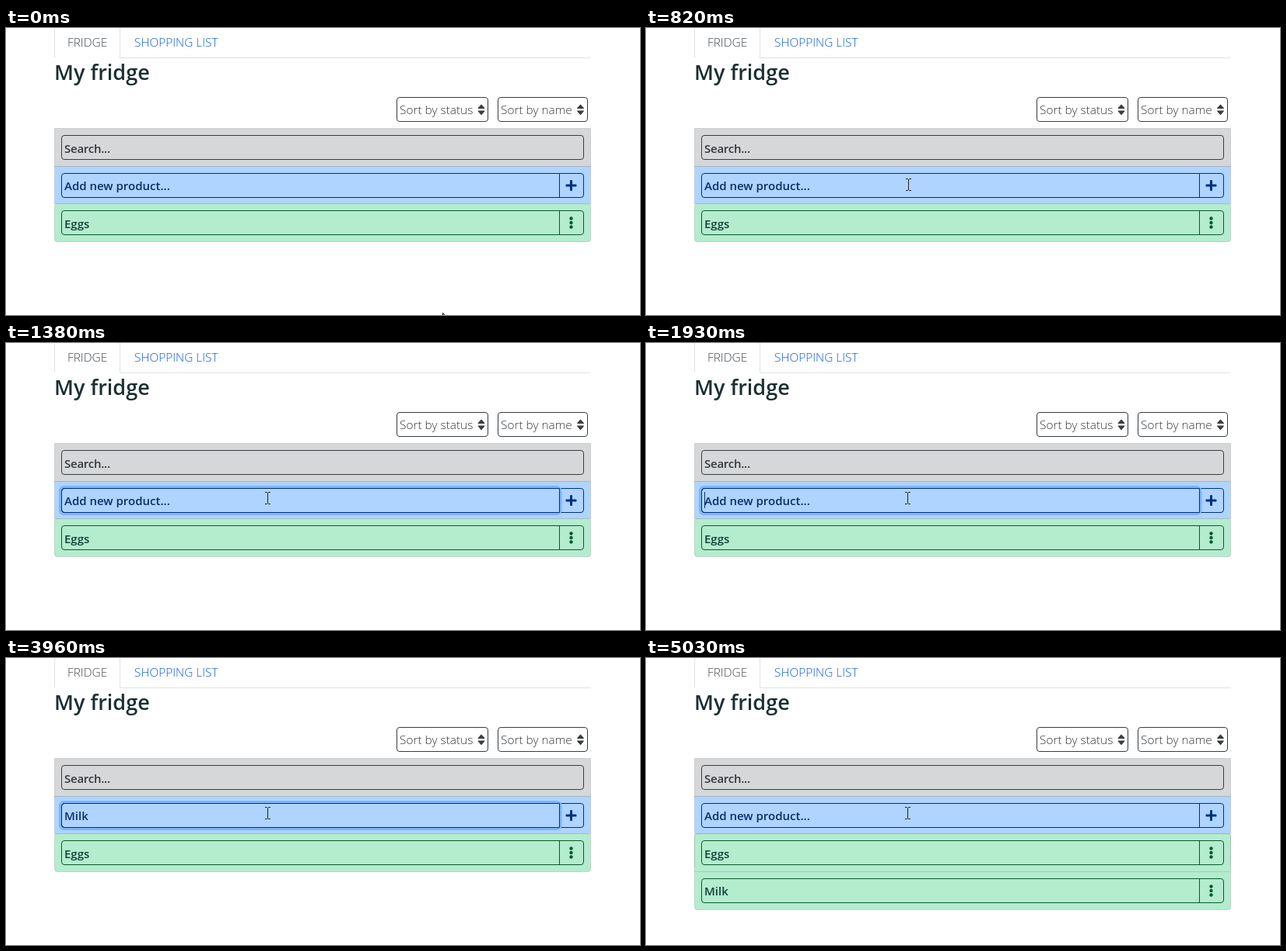
These frames come from a looping animation (815 px wide and 370 px high, 6.04 s). An HTML page:

```html
<!DOCTYPE html>
<html lang="en">
<head>
<meta charset="utf-8">
<title>My fridge</title>
<style>
  html, body { margin: 0; width: 100%; height: 100%; overflow: hidden; background: #fff; }
  svg { display: block; width: 815px; height: 370px; }
  text { font: 600 15px "Open Sans", "Noto Sans", sans-serif; white-space: pre; }
  .thin { font-size: 15.4px; font-weight: 350; }
  .title { font-size: 27px; fill: #1b2f33; }
  .box { fill: none; stroke-width: 1; }
  .edge { stroke: #000; stroke-opacity: .125; }
  .gray { --bg: #d6d7d9; --line: #383d41; --ink: #33383c; }
  .blue { --bg: #aed4ff; --line: #00307c; --ink: #0a2f66; }
  .green { --bg: #b4ecce; --line: #075a2c; --ink: #123f38; }
  .row { fill: var(--bg); }
  .box { stroke: var(--line); }
  .gray text, .blue text, .green text { fill: var(--ink); }
  .icon { fill: var(--line); }

  .anim { animation: 6040ms step-end infinite; }
  #hint { animation-name: hint; }
  #ring { animation-name: ring; }
  #caret { animation-name: blink; }
  #caretPos { animation-name: caretMove; }
  #milk { animation-name: added; }
  #mouse { animation-name: move; }
  #arrow { animation-name: arrow; }
  #beam { animation-name: beam; }
  #k1 { animation-name: key1; }
  #k2 { animation-name: key2; }
  #k3 { animation-name: key3; }
  #k4 { animation-name: key4; }

  @keyframes move {
    0% { transform: translate(562px, 368px); }
    1.32% { transform: translate(537px, 353px); }
    2.48% { transform: translate(499px, 328px); }
    3.64% { transform: translate(455px, 300px); }
    4.96% { transform: translate(414px, 272px); }
    6.12% { transform: translate(382px, 252px); }
    7.28% { transform: translate(361px, 237px); }
    8.44% { transform: translate(350px, 222px); }
    9.76% { transform: translate(344px, 213px); }
    11.09% { transform: translate(341px, 207px); }
    12.41% { transform: translate(337px, 202px); }
    13.9%, 100% { transform: translate(336px, 200px); }
  }
  @keyframes beam {
    0% { opacity: 0; }
    6.12% { opacity: 1; }
    8.44% { opacity: 0; }
    9.76% { opacity: 1; }
    79.47% { opacity: 0; }
    83.27%, 100% { opacity: 1; }
  }
  @keyframes arrow {
    0% { opacity: 1; }
    6.12% { opacity: 0; }
    8.44% { opacity: 1; }
    9.76% { opacity: 0; }
    79.47% { opacity: 1; }
    83.27%, 100% { opacity: 0; }
  }
  @keyframes ring {
    0% { opacity: 0; }
    15.23% { opacity: .2; }
    16.55% { opacity: .6; }
    17.71% { opacity: 1; }
    83.27%, 100% { opacity: 0; }
  }
  @keyframes blink {
    0% { opacity: 0; }
    15.23% { opacity: 1; }
    22.84% { opacity: 0; }
    31.95% { opacity: 1; }
    65.56% { opacity: 0; }
    74.66% { opacity: 1; }
    83.27%, 100% { opacity: 0; }
  }
  @keyframes caretMove {
    0% { transform: translateX(75px); }
    39.56% { transform: translateX(90px); }
    46.19% { transform: translateX(94px); }
    52.64% { transform: translateX(98px); }
    56.45%, 100% { transform: translateX(107px); }
  }
  @keyframes hint {
    0% { opacity: 1; }
    39.56% { opacity: 0; }
    83.27%, 100% { opacity: 1; }
  }
  @keyframes added { 0% { opacity: 0; } 83.27%, 100% { opacity: 1; } }
  @keyframes key1 { 0% { fill-opacity: 0; } 39.56% { fill-opacity: 1; } 83.27%, 100% { fill-opacity: 0; } }
  @keyframes key2 { 0% { fill-opacity: 0; } 46.19% { fill-opacity: 1; } 83.27%, 100% { fill-opacity: 0; } }
  @keyframes key3 { 0% { fill-opacity: 0; } 52.64% { fill-opacity: 1; } 83.27%, 100% { fill-opacity: 0; } }
  @keyframes key4 { 0% { fill-opacity: 0; } 56.45% { fill-opacity: 1; } 83.27%, 100% { fill-opacity: 0; } }
</style>
</head>
<body>
<svg viewBox="0 0 815 370">
  <defs>
    <path id="sort" d="M1.2 6h7.6q1.2 0 .4-1L5.6.9Q5 .3 4.4.9L.8 5q-.8 1 .4 1zM1.2 8.6h7.6q1.2 0 .4 1l-3.6 4.1q-.6.6-1.2 0L.8 9.6q-.8-1 .4-1z"/>
    <g id="dots"><circle r="2.2" cy="-5.5"/><circle r="2.2"/><circle r="2.2" cy="5.5"/></g>
    <g id="field">
      <rect class="box" x="71.5" y=".5" width="671" height="31" rx="3.5"/>
      <path class="box" d="M711.5 .5v31"/>
    </g>
  </defs>

  <!-- tabs -->
  <path class="box" style="stroke:#dee2e6" d="M62.5 0v38M146.5 0v38.5H752"/>
  <text class="thin" x="79" y="24" fill="#3f474e">FRIDGE</text>
  <text class="thin" x="165" y="24" fill="#0b5ed0">SHOPPING LIST</text>
  <text class="title" x="62" y="67">My fridge</text>

  <!-- sort buttons -->
  <g class="gray">
    <rect class="box" x="502.5" y="89.5" width="117" height="31" rx="3.5"/>
    <text class="thin" x="506" y="111">Sort by status</text>
    <use class="icon" href="#sort" x="606" y="98"/>
    <rect class="box" x="632.5" y="89.5" width="115" height="31" rx="3.5"/>
    <text class="thin" x="636" y="111">Sort by name</text>
    <use class="icon" href="#sort" x="733.5" y="98"/>
  </g>

  <!-- search -->
  <g class="gray">
    <rect class="row edge" x="62.5" y="129.5" width="689" height="49"/>
    <rect class="box" x="71.5" y="138.5" width="671" height="31" rx="3.5"/>
    <text x="75" y="161" letter-spacing="-.25">Search...</text>
  </g>

  <!-- new product -->
  <g class="blue">
    <rect class="row edge" x="62.5" y="178.5" width="689" height="48"/>
    <use href="#field" y="187"/>
    <path class="icon" d="M725 197q0-1 1-1h1q1 0 1 1v4.5h4.5q1 0 1 1v1q0 1-1 1H728v4.5q0 1-1 1h-1q-1 0-1-1v-4.500h-4.500q-1 0-1-1v-1q0-1 1-1h4.500z"/>
    <g id="ring" class="anim">
      <rect x="69.500" y="185.500" width="643.500" height="35" rx="5" fill="none" stroke="#7fb3fb" stroke-width="3"/>
      <path class="box" d="M711.500 187.500H75q-3.500 0-3.500 3.500v24q0 3.500 3.500 3.500h636.500z"/>
    </g>
    <text id="hint" class="anim" x="75" y="209">Add new product...</text>
    <text x="75" y="209"><tspan id="k1" class="anim">M</tspan><tspan id="k2" class="anim">i</tspan><tspan id="k3" class="anim">l</tspan><tspan id="k4" class="anim">k</tspan></text>
    <g id="caretPos" class="anim"><rect id="caret" class="anim" y="192" width="1" height="21" fill="#0a2f66"/></g>
  </g>

  <!-- products -->
  <g class="green">
    <rect class="row edge" x="62.500" y="226.500" width="689" height="49" rx="3.500"/>
    <use href="#field" y="235"/>
    <text x="75" y="258">Eggs</text>
    <use class="icon" href="#dots" x="726.500" y="251"/>
    <g id="milk" class="anim">
      <path fill="#fff" d="M62 270h690v7H62z"/>
      <path class="row edge" d="M66 226.500h682q3.500 0 3.500 3.500v91q0 3.500-3.500 3.500H66q-3.500 0-3.500-3.500v-91q0-3.500 3.500-3.500z"/>
      <path class="edge" d="M63 275.500h688"/>
      <use href="#field" y="235"/>
      <text x="75" y="258">Eggs</text>
      <use class="icon" href="#dots" x="726.500" y="251"/>
      <use href="#field" y="284"/>
      <text x="75" y="306">Milk</text>
      <use class="icon" href="#dots" x="726.500" y="300"/>
    </g>
  </g>

  <g id="mouse" class="anim">
    <path id="beam" class="anim" fill="none" stroke="#222" d="M-3 -7.500h2.500l1 1 1-1H4M.500 -7v14M-3 7.500h2.500l1-1 1 1H4"/>
    <path id="arrow" class="anim" fill="#fff" stroke="#111" stroke-linejoin="round" d="M-.500 -.500v15.500l3.500-3.300 2.500 5.800 2.500-1.100-2.500-5.600h5z"/>
  </g>
</svg>
</body>
</html>
```
